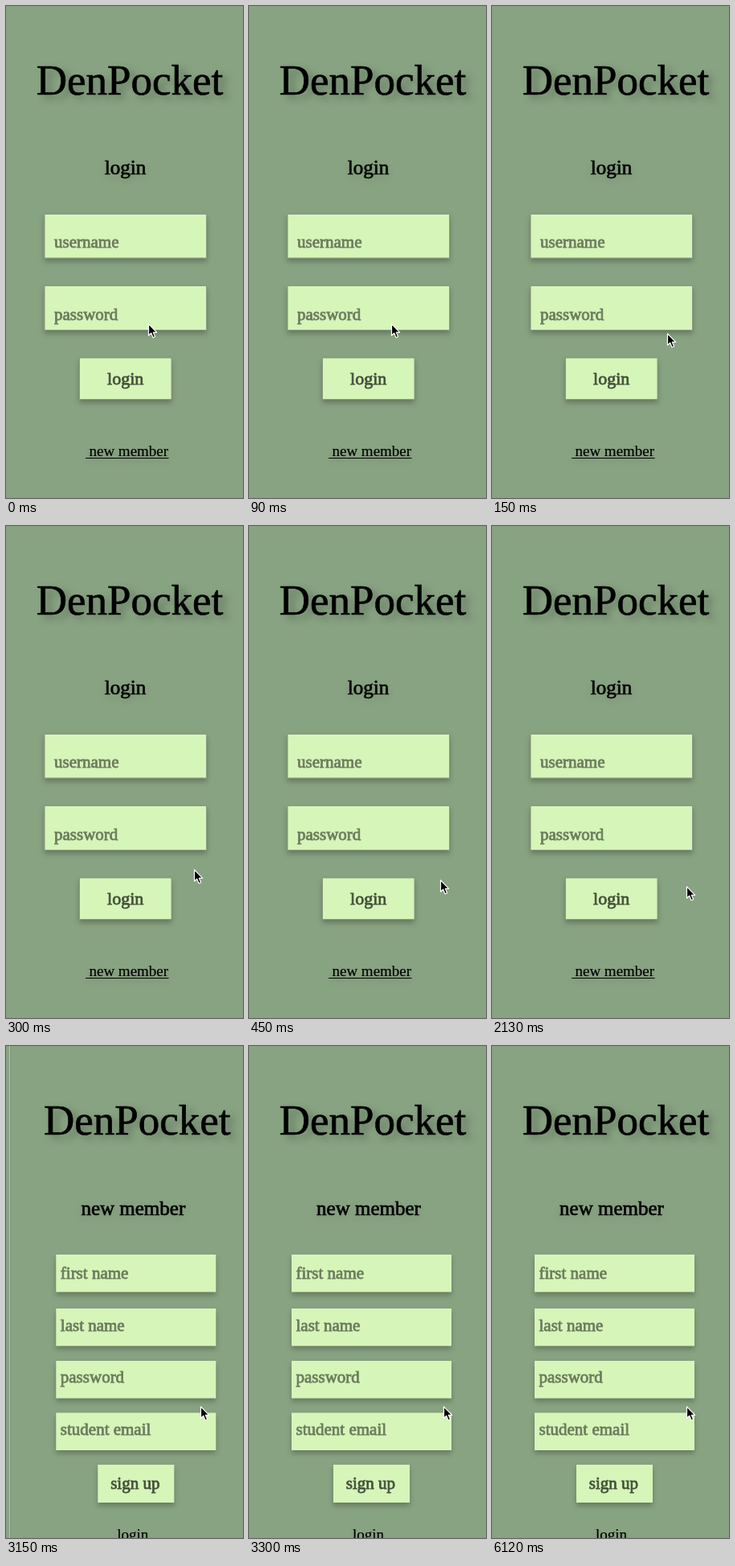
Recreate the animation shown at these times as an HTML page. Size 295 by 611 pixels, loop 8000 ms.

```html
<!DOCTYPE html>
<html lang="en">
<head>
<meta charset="utf-8">
<title>Login</title>
<style>
  html, body { margin: 0; width: 100%; height: 100%; overflow: hidden; background: #88a382; }
  svg { display: block; width: 295px; height: 611px; font-family: "Liberation Serif", "Times New Roman", serif; }

  .title { font-size: 53px; text-anchor: middle; stroke: #000; stroke-width: .7px; filter: drop-shadow(7px 5px 5px rgba(0, 0, 0, .25)); }
  .head, .link, .button text { text-anchor: middle; }
  .head { font-size: 25px; stroke: #000; stroke-width: .7px; filter: drop-shadow(0 3px 4px rgba(0, 0, 0, .1)); }
  .link { font-size: 19px; stroke: #000; stroke-width: .2px; filter: drop-shadow(0 4px 3px rgba(0, 0, 0, .1)); }

  rect.box { fill: #d6f5b8; filter: drop-shadow(0 4px 3px rgba(0, 0, 0, .25)); }
  .outlined rect.box { stroke: #8a9a82; stroke-width: 1px; }
  .field text { font-size: 21px; fill: #6b7b5e; stroke: #6b7b5e; stroke-width: .8px; }
  .button text { font-size: 21px; fill: #43503b; stroke: #43503b; stroke-width: .8px; }
  .outlined .button text { font-size: 22px; }

  .cursor, .login, .signup, .edge { animation: 8s step-end infinite; }
  .cursor { animation-name: move; }
  .login { animation-name: leave; }
  .signup { animation-name: enter; }
  .edge { animation-name: flash; }

  @keyframes move {
    0% { transform: translate(176px, 394px); }
    1.875% { transform: translate(217px, 406px); }
    3.75% { transform: translate(233px, 426px); }
    5.625% { transform: translate(237px, 439px); }
    7.5%, 100% { transform: translate(241px, 447px); }
  }
  @keyframes leave {
    0% { visibility: visible; }
    39.375%, 100% { visibility: hidden; }
  }
  @keyframes enter {
    0% { visibility: hidden; transform: translateX(9.3px); }
    39.375% { visibility: visible; transform: translateX(9.3px); }
    41.25%, 100% { visibility: visible; transform: none; }
  }
  @keyframes flash {
    0% { visibility: hidden; }
    39.375% { visibility: visible; }
    41.25%, 100% { visibility: hidden; }
  }
</style>
</head>
<body>
<svg viewBox="0 0 295 611">
  <rect width="295" height="611" fill="#88a382"/>

  <g class="login outlined">
    <text class="title" x="154" y="110">DenPocket</text>
    <text class="head" x="148.5" y="209">login</text>
    <g class="field">
      <rect class="box" x="48" y="258.5" width="201.5" height="54.5"/>
      <text x="60" y="300">username</text>
    </g>
    <g class="field">
      <rect class="box" x="48" y="347.5" width="201.5" height="55"/>
      <text x="60" y="390">password</text>
    </g>
    <g class="button">
      <rect class="box" x="91.5" y="437" width="114.5" height="51.5"/>
      <text x="148.7" y="470">login</text>
    </g>
    <g class="link">
      <text x="152.8" y="559">new member</text>
      <path d="M99 561.5H202.5" stroke-width="1"/>
    </g>
  </g>

  <g class="signup">
    <text class="title" x="154" y="110">DenPocket</text>
    <text class="head" x="149" y="210">new member</text>
    <g class="field">
      <rect class="box" x="53" y="259" width="199" height="46.5"/>
      <text x="58.5" y="289">first name</text>
    </g>
    <g class="field">
      <rect class="box" x="53" y="326" width="199" height="46.5"/>
      <text x="58.5" y="354">last name</text>
    </g>
    <g class="field">
      <rect class="box" x="53" y="391" width="199" height="46.5"/>
      <text x="58.5" y="418">password</text>
    </g>
    <g class="field">
      <rect class="box" x="53" y="455.5" width="199" height="46.5"/>
      <text x="58.5" y="483">student email</text>
    </g>
    <g class="button">
      <rect class="box" x="105" y="520" width="95" height="47"/>
      <text x="151.5" y="550">sign up</text>
    </g>
    <text class="link" x="148.5" y="613">login</text>
  </g>

  <g class="edge">
    <path d="M4.5 0V611" stroke="#b9c6b5"/>
    <path d="M5.5 0V611" stroke="#7d9579"/>
  </g>

  <g class="cursor">
    <path d="M1.5 .8V15.2L4.7 12.2L7 17.8L9.6 16.700L7.3 11.300H11.7Z"
          stroke="#fff" stroke-width="1.2" stroke-linejoin="round"/>
  </g>
</svg>
</body>
</html>
```
